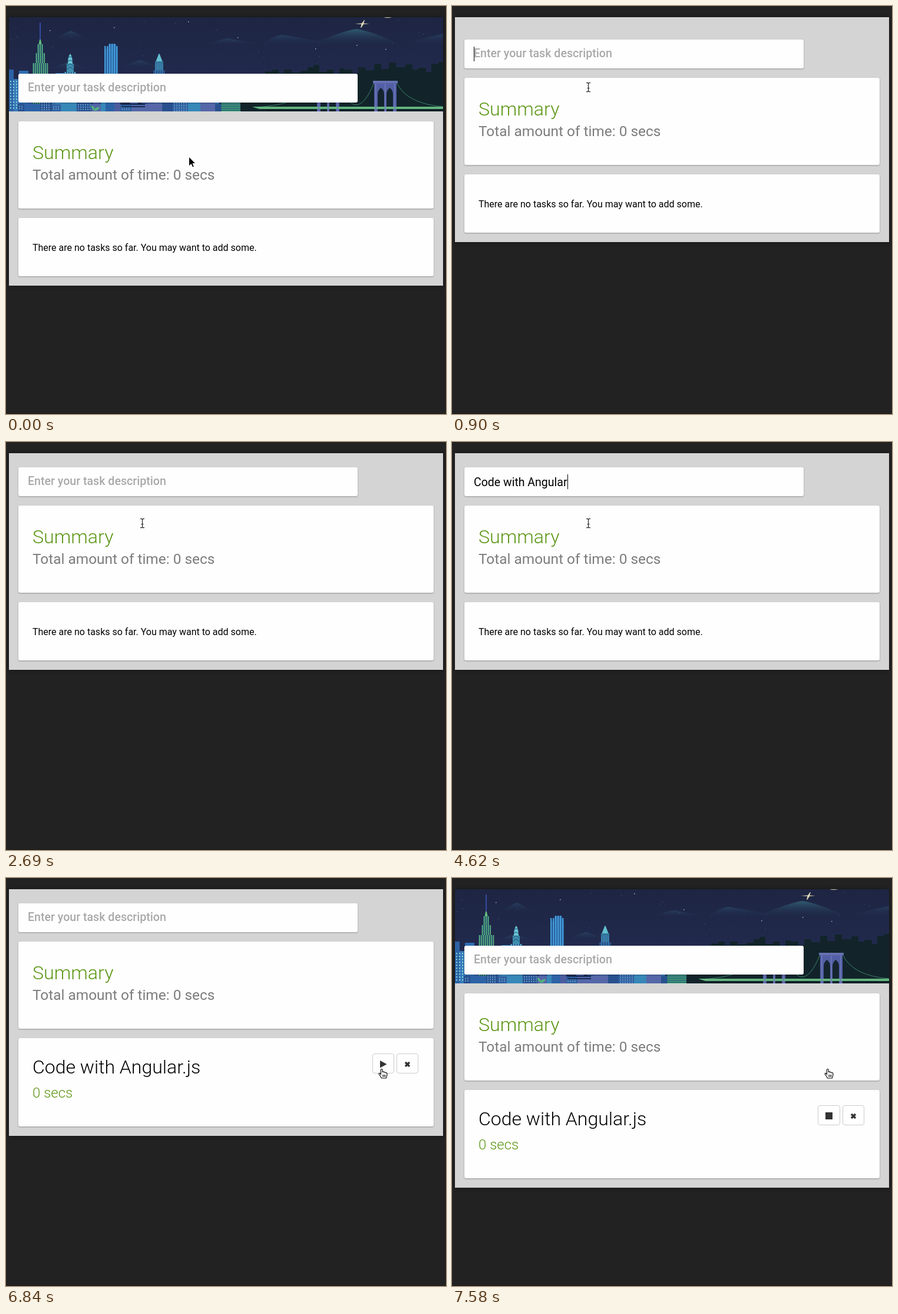
These frames come from a looping animation (747x693 px, 8000 ms). An HTML page:

```html
<!DOCTYPE html>
<html lang="en">
<head>
<meta charset="utf-8">
<title>Task timer</title>
<style>
  html, body { margin: 0; width: 100%; height: 100%; overflow: hidden; background: #222; }
  svg { display: block; width: 747px; height: 693px; }
  text { font-family: Roboto, "Open Sans", sans-serif; white-space: pre; }
  .panel { fill: #d4d4d4; filter: drop-shadow(0 0 3px rgba(0,0,0,.45)); }
  .card { fill: #fefefe; filter: drop-shadow(0 1px 1px rgba(0,0,0,.3)); }
  .button { fill: #fff; stroke: #ccc; }
  .title { font-size: 32.2px; font-weight: 300; fill: #5c9614; }
  .name { font-size: 32px; font-weight: 300; }
  .total { font-size: 24.4px; font-weight: 400; fill: #7c7c7c; }
  .secs { font-size: 24px; font-weight: 300; fill: #5c9614; }
  .note { font-size: 16px; }
  .hint { font-size: 19.6px; font-weight: 500; fill: #a9a9a9; }
  .typed { font-size: 19.5px; }
</style>
</head>
<body>
<svg viewBox="0 0 747 693">
  <defs>
    <clipPath id="window"><rect id="windowRect" x="5" y="19" width="737" height="160"/></clipPath>
    <linearGradient id="sky" x2="0" y2="1">
      <stop stop-color="#1e2543"/><stop offset="1" stop-color="#232d53"/>
    </linearGradient>
    <linearGradient id="hill" x2="0" y2="1">
      <stop stop-color="#2f5b70"/><stop offset="1" stop-color="#202a4a" stop-opacity="0"/>
    </linearGradient>
    <linearGradient id="dimHill" x2="0" y2="1">
      <stop stop-color="#27405f"/><stop offset="1" stop-color="#202a4a" stop-opacity="0"/>
    </linearGradient>
  </defs>
  <rect width="747" height="693" fill="#222"/>
  <rect y="692" width="747" height="1" fill="#1b1b1b"/>
  <rect id="panel" class="panel" x="5" y="19" width="737"/>
  <g id="header" clip-path="url(#window)"><g id="city"></g></g>

  <g id="entry">
    <rect class="card" x="21" y="43" width="576" height="49" rx="3"/>
    <text id="hint" class="hint" x="37" y="73">Enter your task description</text>
    <text id="typed" class="typed" x="37" y="75"></text>
    <rect id="caret" y="55" width="1" height="25"/>
  </g>

  <g id="cards">
    <rect class="card" x="21" y="0" width="705" height="148" rx="3"/>
    <text class="title" x="45" y="64">Summary</text>
    <text class="total" x="45" y="99">Total amount of time: 0 secs</text>
    <rect id="taskCard" class="card" x="21" y="164" width="705" rx="3"/>
    <text id="empty" class="note" x="45" y="220">There are no tasks so far. You may want to add some.</text>
    <g id="task" transform="translate(0 164)">
      <text class="name" x="45" y="60">Code with Angular.js</text>
      <text class="secs" x="45" y="101">0 secs</text>
      <rect id="toggle" class="button" y="26.5" height="33" rx="3.5"/>
      <path id="play" d="M635 38l11.5 6.2l-11.5 6.2z" fill="#333"/>
      <rect id="stop" x="634" y="38" width="12" height="12" fill="#333"/>
      <rect class="button" x="663.5" y="26.5" width="36" height="33" rx="3.5"/>
      <path d="M678 41l7 7m0-7l-7 7" stroke="#333" stroke-width="3.4"/>
    </g>
  </g>

  <g id="arrow"><path d="M0 0V16L3.8 12.6L6.3 18L8.9 16.9L6.5 11.6H11.4Z" stroke="#fff"/></g>
  <g id="beam" fill="none">
    <path d="M-3.5-7.5Q0-8 0-6Q0-8 3.5-7.5M0-6V6M-3.5 7.5Q0 8 0 6Q0 8 3.5 7.5M-2 1.5H2" stroke="#fff" stroke-width="2.6" opacity=".6"/>
    <path d="M-3.5-7.5Q0-8 0-6Q0-8 3.5-7.5M0-6V6M-3.5 7.5Q0 8 0 6Q0 8 3.5 7.5M-2 1.5H2" stroke="#222" stroke-width="1.2"/>
  </g>
  <g id="hand">
    <path d="M-3.6-6.5Q-2.2-9-.8-6.5V-2.6Q.8-3.8 1.8-2Q3.6-3 4.4-1.2Q6.8-1.8 7 .8Q7 4 5.2 8H-2.5Q-4 5-7 1Q-6.8-1.2-4.8 0L-3.6 1.4Z" fill="#fff" stroke="#111" stroke-width="1.2"/>
    <path d="M-.2 2V6M1.8 2V6M3.8 2V6" stroke="#111"/>
  </g>
</svg>
<script>
const LOOP = 8000;
const $ = id => document.getElementById(id);
const set = (id, attrs) => { for (const k in attrs) $(id).setAttribute(k, attrs[k]); };
const show = (id, on) => set(id, { display: on ? 'inline' : 'none' });

let seed = 11;
const random = () => (seed = (seed * 16807) % 2147483647) / 2147483647;

function drawCity() {
  const out = [];
  const box = (x, y, w, h, fill) => out.push(`<rect x="${x}" y="${y}" width="${w}" height="${h}" fill="${fill}"/>`);
  const path = (d, fill, more = '') => out.push(`<path d="${d}" fill="${fill}" ${more}/>`);
  const stroke = (d, color, width = 1) => path(d, 'none', `stroke="${color}" stroke-width="${width}"`);
  const stripes = (x, y, w, h, color, gap = 4) => {
    for (let i = 1; i < w; i += gap) box(x + i, y, 1.4, h, color);
  };
  const windows = (x, y, w, h, color, gap = 5) => {
    for (let j = 3; j < h - 2; j += gap)
      for (let i = 2; i < w - 2; i += gap) box(x + i, y + j, 2, 2.5, color);
  };
  const hill = (x, w, top, base, peak = .5, fill = 'hill') => {
    const p = x + w * peak;
    path(`M${x} ${base}Q${p - w * .15} ${top + 3} ${p} ${top}Q${p + w * .15} ${top + 3} ${x + w} ${base}Z`, `url(#${fill})`);
  };

  box(5, 19, 737, 160, 'url(#sky)');
  hill(80, 60, 42, 58, .5, 'dimHill');
  hill(335, 105, 55, 66, .4, 'dimHill');
  hill(436, 130, 49, 66, .25, 'dimHill');
  hill(515, 160, 39, 67);
  hill(668, 130, 47, 66, .6, 'dimHill');
  hill(72, 80, 96, 109, .4, 'dimHill');
  hill(190, 75, 92, 105, .5, 'dimHill');

  for (let i = 0; i < 22; i++) box(8 + random() * 730, 22 + random() * 78, 1, 1, '#56628a');
  for (const [x, y] of [[309, 26], [74, 41], [183, 36], [393, 53], [525, 72], [595, 66], [644, 73]])
    box(x, y, 1.4, 1.4, '#c0c6d8');
  path('M641 19Q648 21.5 655 19Z', '#bdb9a8');
  path('M592 30L604 29.5L608 24L609 24L607 29.5L617 30L607 31L603 37L602 37L603.5 31Z', '#e6dfba');

  // Towers on the left bank
  const blocks = [[5, 124, 17, '#3778b8'], [5, 108, 8, '#2d62a6'], [22, 110, 16, '#2e6db2'],
    [38, 117, 9, '#35599f'], [72, 119, 12, '#3a78b8'], [84, 114, 17, '#3f87c2'],
    [118, 124, 8, '#35599f'], [126, 116, 17, '#4b5d9f'], [147, 126, 13, '#41549a'],
    [211, 127, 13, '#465a9f'], [230, 133, 20, '#2f4d88'], [285, 128, 25, '#485b9f'],
    [316, 120, 13, '#5567a8'], [330, 130, 15, '#2f5f9f'], [348, 125, 14, '#3978b8']];
  for (const [x, y, w, fill] of blocks) box(x, y, w, 179 - y, fill);
  windows(5, 124, 17, 55, '#7fd0d8');
  windows(84, 114, 17, 20, '#5ba5d0');
  windows(126, 116, 17, 20, '#6a7cba');

  stroke('M58 28V60', '#415ccf', 1.4);
  path('M55 68L57 57H59L61 68Z', '#63bd7d');
  for (const [x, y, w, h] of [[53, 65, 10, 16], [50, 80, 16, 18], [45, 97, 26, 82]]) {
    box(x, y, w, h, '#24506e');
    stripes(x, y, w, h, '#63bd7d', 3.4);
  }
  path('M105 98Q105 86 109 81Q113 86 113 98Z', '#69c7d4');
  box(103, 98, 12, 18, '#3d8fae');
  box(99, 112, 20, 67, '#2c5f97');
  stripes(99, 112, 20, 67, '#6cbfd0');
  for (let y = 86; y < 110; y += 6) stroke(`M104 ${y + 4}Q109 ${y - 4} 114 ${y + 4}`, '#244b78');

  box(167, 73, 23, 106, '#224b88');
  box(174, 65, 13, 114, '#285a9a');
  for (let x = 167; x < 190; x += 4) box(x, x > 172 && x < 186 ? 64 : 68, 2.4, 115, '#439bd8');

  path('M254 95L259.5 81H260.5L266 95Z', '#63c0d0');
  box(253, 94, 14, 16, '#35759b');
  box(250, 109, 20, 70, '#284f85');
  stripes(252, 98, 16, 80, '#3b80b6');

  // Street level
  const hues = ['#2f5f9f', '#4b5d9f', '#2d62a6', '#5567a8', '#3787b8', '#28508f'];
  for (let x = 20; x < 412;) {
    const w = 8 + Math.floor(random() * 20), y = 160 + random() * 8;
    box(x, y, w, 179 - y, hues[Math.floor(random() * hues.length)]);
    if (random() > .6) windows(x, y, w, 179 - y, '#5a93c4', 4);
    x += w;
  }
  box(365, 164, 37, 15, '#286b73');
  for (let y = 166; y < 179; y += 3) box(366, y, 35, 1, '#53ad80');
  stroke('M196 167H236M196 171H236', '#152c57', 2);
  path('M150 178Q143 171 145 169Q150 171 151 175Q154 171 159 172Q156 178 150 178Z', '#54b47b');

  // Far bank and bridge
  const roofs = [[398, 132], [408, 126], [416, 128], [424, 115], [433, 119], [440, 111], [452, 108],
    [463, 114], [472, 108], [485, 113], [500, 110], [512, 104], [522, 100], [532, 112], [545, 108],
    [556, 115], [566, 106], [575, 108], [588, 114], [598, 104], [610, 109], [625, 98], [637, 107],
    [650, 96], [662, 104], [678, 99], [690, 108], [700, 105], [713, 112], [722, 98], [734, 95]];
  path('M398 179' + roofs.map(([x, y]) => `H${x}V${y}`).join('') + 'H742V179Z', '#12242a');
  const cable = '#3b8068';
  stroke('M422 172Q500 169 529 130M565 130Q594 206 625 130M663 130Q680 166 742 171', cable);
  path('M418 171H742V175H430Z', '#64b580');
  box(440, 175, 302, 4, '#0d2025');
  for (const x of [526, 623]) {
    box(x, 127, 42, 4, '#6672b2');
    box(x + 2, 131, 38, 48, '#535fa5');
    for (const a of [x + 8, x + 23])
      path(`M${a} 179V150Q${a} 143 ${a + 5.5} 139Q${a + 11} 143 ${a + 11} 150V179Z`, '#14252e');
    box(x + 2, 171, 38, 4, '#64b580');
    for (const c of [x + 4, x + 20, x + 36]) box(c, 132, 1.5, 47, '#6f79b8');
  }
  $('city').innerHTML = out.join('');
}

// Each track holds its value until the next time.
const tracks = {
  opening: [[0, 1], [750, .69], [900, .194], [1050, .03], [1200, 0],
    [7130, .295], [7280, .79], [7430, .97], [7580, 1]],
  caret: [[0, 0], [750, 1], [1640, 0], [2240, 1], [2690, 0], [2990, 1], [5800, 0], [6250, 1], [6840, 0]],
  letters: [[0, 0], [2990, 1], [3140, 2], [3290, 4], [3440, 6], [3590, 8], [3740, 10], [4030, 11],
    [4180, 12], [4330, 14], [4470, 15], [4620, 17], [4770, 18], [4910, 19], [5060, 20], [5350, 0]],
  mouse: [[0, ['arrow', 310.5, 256]], [150, ['arrow', 300, 237]], [300, ['beam', 246, 154]],
    [450, ['beam', 231.5, 138]], [6100, ['arrow', 250, 162]], [6250, ['arrow', 335, 255]],
    [6400, ['arrow', 465, 338]], [6540, ['arrow', 580, 346]], [6690, ['hand', 635, 337]],
    [6840, ['hand', 640, 332]]]
};
const at = (name, t) => tracks[name].findLast(([start]) => start <= t)[1];

function render(t) {
  const opening = at('opening', t);
  const pictured = t < 750 || t >= 7130;
  const added = t >= 5350;
  const running = t >= 7130;

  const height = Math.round(160 * opening);
  show('header', pictured);
  set('windowRect', { height });
  set('city', { transform: `translate(0 ${height - 160})` });

  const shift = Math.round(72 * opening);
  const cardsTop = 108 + shift + (pictured ? 16 : 0);
  const taskHeight = added ? 150 : 99;
  set('entry', { transform: `translate(0 ${shift})` });
  set('cards', { transform: `translate(0 ${cardsTop})` });
  set('taskCard', { height: taskHeight });
  set('panel', { height: cardsTop + 164 + taskHeight + 16 - 19 });
  show('empty', !added);
  show('task', added);
  show('play', !running);
  show('stop', running);
  set('toggle', { x: running ? 621.5 : 622.5, width: running ? 37 : 36 });

  const letters = at('letters', t);
  $('typed').textContent = 'Code with Angular.js'.slice(0, letters);
  show('hint', !letters);
  show('caret', at('caret', t));
  set('caret', { x: 37 + (letters ? Math.round($('typed').getComputedTextLength()) : 0) });

  const [shape, x, y] = at('mouse', t);
  for (const id of ['arrow', 'beam', 'hand']) show(id, id === shape);
  set(shape, { transform: `translate(${x} ${y})` });
}

drawCity();
const began = performance.now();
function tick() {
  render((performance.now() - began) % LOOP);
  requestAnimationFrame(tick);
}
tick();
</script>
</body>
</html>
```
